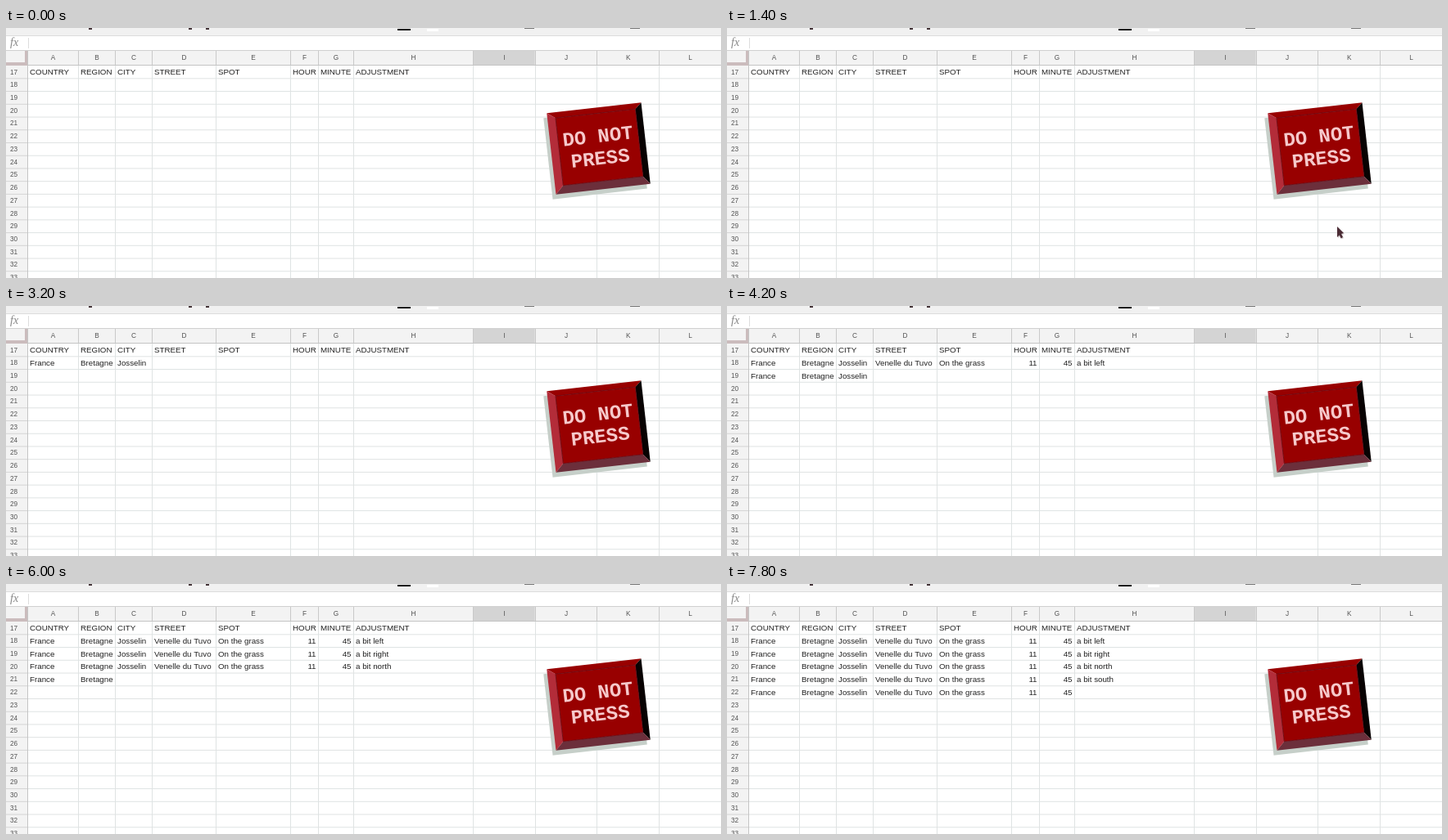
Write an HTML page with a canvas that moves like this. It is 873 px wide and 306 px high and loops after 8 s.

```html
<!DOCTYPE html>
<html lang="en">
<head>
<meta charset="utf-8">
<title>Spreadsheet button</title>
<style>
  html, body { margin: 0; width: 100%; height: 100%; overflow: hidden; background: #fff; }
  canvas { display: block; }
</style>
</head>
<body>
<canvas id="stage" width="873" height="306"></canvas>
<script>
const ctx = document.getElementById('stage').getContext('2d');
const W = 873, H = 306, LOOP = 8000, STEP = 200;
const LEFT = 26, TOP = 45.6, ROW_H = 15.73, FIRST_ROW = 17;
const SANS = '"Liberation Sans", Arial, sans-serif';
const SHIFTS = ['left', 'right', 'north', 'south', 'east'];

const column = (width, title = '', value = '', numeric = false) => ({ width, title, value, numeric });
const filled = [
  column(62, 'COUNTRY', 'France'),
  column(45, 'REGION', 'Bretagne'),
  column(45, 'CITY', 'Josselin'),
  column(78, 'STREET', 'Venelle du Tuvo'),
  column(91, 'SPOT', 'On the grass'),
  column(34, 'HOUR', '11', true),
  column(43, 'MINUTE', '45', true),
  column(146, 'ADJUSTMENT', 'a bit '),
];
const columns = [...filled, ...Array.from({ length: 4 }, () => column(75.7))];
columns.reduce((x, col) => (col.x = x) + col.width, LEFT);

function rect(color, x, y, w, h) {
  ctx.fillStyle = color;
  ctx.fillRect(x, y, w, h);
}

function poly(color, points) {
  ctx.fillStyle = color;
  ctx.beginPath();
  points.forEach(([x, y]) => ctx.lineTo(x, y));
  ctx.closePath();
  ctx.fill();
}

function text(str, x, y, font, color, align = 'left') {
  ctx.font = font;
  ctx.fillStyle = color;
  ctx.textAlign = align;
  ctx.fillText(str, x, y);
}

function drawToolbar() {
  rect('#f1f1f1', 0, 0, W, 9);
  rect('#dcdcdc', 0, 9, W, 1);
  for (const x of [103, 225, 246]) rect('#443438', x - 2, 0, 4, 2);
  for (const x of [639, 768]) rect('#777', x - 6, 0, 12, 1);
  rect('#000', 478, 1, 16, 2);
  rect('#fff', 514, 1, 14, 3);
  text('fx', 5, 22, 'italic 14px "Liberation Serif", Times, serif', '#888');
  rect('#ddd', 27, 12, 1, 13);
}

function drawGrid() {
  rect('#f3f3f3', 0, 27, W, 18);
  rect('#f3f3f3', 0, 45, LEFT, H);
  rect('#d0d0d0', 0, 27, W, 1);

  columns.forEach(({ x, width }, i) => {
    const line = Math.round(x);
    if (i === 8) rect('#d4d4d4', line, 28, width, 17);
    rect('#c9c9c9', line, 28, 1, 17);
    rect('#dfe3e3', line, 45, 1, H);
    text(String.fromCharCode(65 + i), x + width / 2 + .5, 39, '8.25px ' + SANS, '#555', 'center');
  });
  for (let row = 0, y = TOP; y < H; row++, y += ROW_H) {
    rect('#d4d4d4', 0, y + ROW_H, LEFT, 1);
    rect('#dfe3e3', LEFT, y + ROW_H, W, 1);
    text(FIRST_ROW + row, 9.5, y + 10.9, '8.25px ' + SANS, '#555', 'center');
  }
  rect('#c4c4c4', 0, 45, W, 1);
  rect('#c4c4c4', LEFT, 28, 1, H);
  rect('#cbbcbd', 0, 42, LEFT, 4);
  rect('#cbbcbd', LEFT - 3, 28, 3, 18);
}

function drawCell(row, { x, width }, value, right = false) {
  text(value, right ? x + width - 2.5 : x + 3, TOP + row * ROW_H + 11.7,
    '9.75px ' + SANS, '#222', right ? 'right' : 'left');
}

function drawCells(count) {
  filled.forEach(col => drawCell(0, col, col.title));
  for (let i = 0; i < count; i++) {
    const row = Math.floor(i / filled.length);
    const col = filled[i % filled.length];
    const suffix = col.title === 'ADJUSTMENT' ? SHIFTS[row] : '';
    drawCell(row + 1, col, col.value + suffix, col.numeric);
  }
}

function drawButton() {
  const box = (l, t, r, b) => [[l, t], [r, t], [r, b], [l, b]];
  const outer = box(-58, -50, 58, 50);
  const inner = box(-48, -43, 50, 40);
  const label = (str, y) =>
    text(str, .7, y, 'bold 24px "Liberation Mono", "Courier New", monospace', '#f6c9cb', 'center');

  ctx.save();
  ctx.translate(723.5, 147.5);
  ctx.rotate(-.113);
  poly('#c6cfc9', outer.map(([x, y]) => [x - 4.6, y + 5.5]));
  ['#980000', '#080202', '#6c2f3b', '#b32c39'].forEach((color, a) => {
    const b = (a + 1) % 4;
    poly(color, [outer[a], outer[b], inner[b], inner[a]]);
  });
  poly('#980000', inner);
  ctx.strokeStyle = '#6a0510';
  ctx.lineWidth = .8;
  ctx.stroke();
  label('DO NOT', -7.5);
  label('PRESS', 19.7);
  ctx.restore();
}

// The pointer rises to the button, presses it and goes back down.
function drawPointer(t) {
  const away = Math.abs(t - 1000);
  if (away > 700) return;
  const x = 736 + away * .0225, y = 182 + away * .1525;
  const arrow = [[0, 0], [8, 8], [5, 9], [7, 13], [4.5, 14.5], [2.8, 10.5], [0, 13]];
  const shape = (color, shift) => poly(color, arrow.map(([px, py]) => [x + px + shift, y + py + shift]));
  shape('#d2cccd', 1);
  shape('#4b2c35', 0);
}

// Cells fill at a rate that slows a little as the sheet grows.
function filledCells(t) {
  const s = (t - 2800) / 1000;
  return s < 0 ? 0 : Math.round(8.7 * s - .16 * s * s - .6);
}

function draw(now) {
  const t = Math.floor(now % LOOP / STEP) * STEP;
  rect('#fff', 0, 0, W, H);
  drawToolbar();
  drawGrid();
  drawCells(filledCells(t));
  drawButton();
  drawPointer(t);
}

const start = performance.now();
function tick() {
  draw(performance.now() - start);
  requestAnimationFrame(tick);
}
tick();
</script>
</body>
</html>
```
